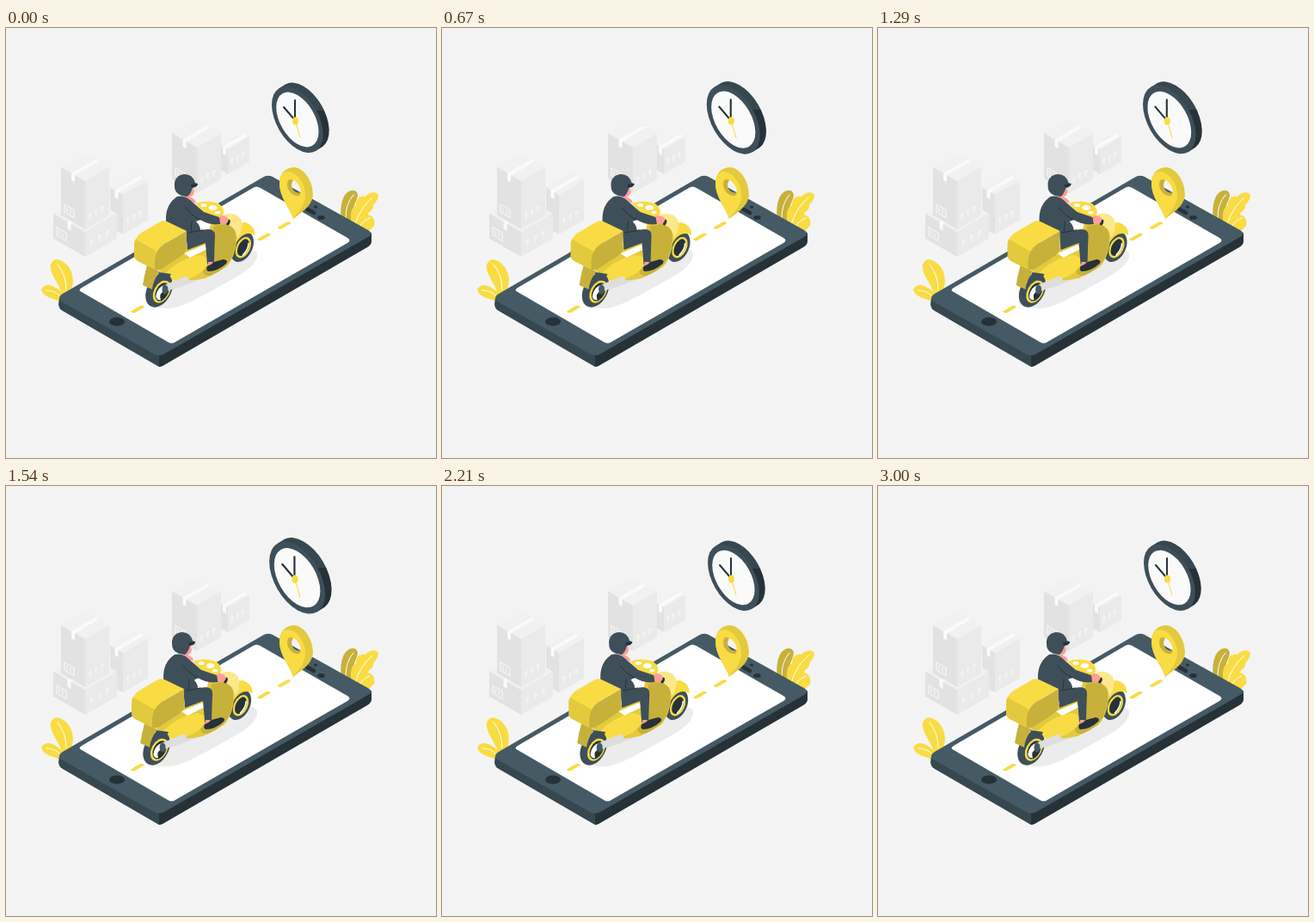
An HTML page that plays this animation: 500x500 px, repeating every 3040 ms.

```html
<!DOCTYPE html>
<html lang="en">
<head>
<meta charset="utf-8">
<title>Scooter delivery</title>
<style>
html, body { margin: 0; width: 100%; height: 100%; overflow: hidden; background: #f3f3f3; }
svg { display: block; width: 100vw; height: 100vh; }
.y { fill: #f9dc43; }
.m { fill: #e3c93d; }
.d { fill: #c7b13b; }
.n { fill: #37474f; }
.r { fill: #3f4f5a; }
.k { fill: #263238; }
.s { fill: #455a64; }
.w { fill: #fff; }
.p { fill: #ff9e98; }
.line { fill: none; stroke-linecap: round; stroke-linejoin: round; }
</style>
</head>
<body>
<svg viewBox="0 0 500 500">
  <defs>
    <linearGradient id="rim" x1="0" y1="62" x2="0" y2="146" gradientUnits="userSpaceOnUse">
      <stop offset=".4" stop-color="#37474f"/><stop offset=".4" stop-color="#263238"/>
    </linearGradient>
  </defs>

  <ellipse cx="250" cy="300" rx="217" ry="125" fill="#f4f4f4"/>
  <g id="cartons"></g>

  <!-- plants -->
  <path class="y" d="M65 311C64 299 50 287 52 275Q56 266 65 271C76 277 81 291 76 305Z"/>
  <path class="y" d="M63 318C54 314 43 313 41 304Q45 297 54 300Q63 304 69 312Z"/>
  <path class="line" stroke="#fff" d="M60 275Q70 287 70 304M47 305Q57 305 63 312"/>
  <path class="d" d="M390 223C388 207 391 192 401 189Q408 188 409 194C408 203 402 207 402 226Z"/>
  <path class="y" d="M403 232C399 218 401 209 407 206C407 198 413 194 418 196C423 190 432 190 433 195C432 203 426 204 427 209C424 214 421 214 421 217C428 219 429 224 428 230L420 238Z"/>
  <path class="line" stroke="#fff" d="M395 221Q395 204 404 194M406 229Q411 210 426 197M411 231Q416 223 423 221"/>

  <!-- phone -->
  <path class="k" d="M178 380L425 238V248Q425 252 420 255L182 393Q180 394 178 394Z"/>
  <path class="n" d="M62 314L178 380V394L66 329Q61 326 61 321Z"/>
  <path class="s" d="M66 309L298 174Q304 170 310 173L421 235Q428 239 421 243L184 379Q178 382 172 379L66 319Q58 314 66 309Z"/>
  <path class="w" d="M88 302L287 186Q291 183 296 186L397 244Q402 247 397 250L197 365Q193 368 188 365L88 307Q83 305 88 302Z"/>
  <ellipse class="k" cx="129" cy="341.500" rx="9" ry="5"/>
  <path class="line" stroke="#263238" stroke-width="4.500" d="M350 210.500L358 215"/>
  <ellipse class="k" cx="366.500" cy="220.500" rx="4.300" ry="2.500"/>
  <ellipse class="k" cx="360" cy="208" rx="2.200" ry="1.500"/>
  <path class="y" id="dashes"/>

  <!-- location pin -->
  <path class="m" fill-rule="evenodd" d="M334 222C330 209 318 197 318 181C318 169 325 162 336 162C348 164 357 179 357 194C356 207 344 214 334 222ZM334 177C339 176 344 184 343 190C342 194 336 192 333 187C331 182 331 178 334 177Z"/>
  <path class="y" fill-rule="evenodd" d="M334 222C330 209 318 197 318 181C318 172 322 167 328 167C340 168 349 183 348 197C347 207 340 213 334 222ZM330 176C326 176 326 182 328 187C331 193 337 197 341 195C344 192 343 187 340 182C337 178 333 175 330 176Z"/>
  <path class="d" d="M330 176Q326 178 328 187Q333 196 341 195L343 191Q337 193 333 187Q331 181 334 177Z"/>

  <!-- scooter shadow -->
  <path fill="#ececec" d="M163 318C165 309 180 302 200 292L270 258C283 253 294 258 292 266C289 277 275 286 258 295C232 309 212 322 193 326Q164 327 163 318Z"/>

  <g id="scooter">
    <!-- front wheel and fender -->
    <g transform="translate(274.500 254.500) rotate(26)">
      <ellipse class="r" rx="12" ry="18.500"/>
      <ellipse class="y" cx="1.500" rx="8" ry="13"/>
      <ellipse class="k" cx="1.500" rx="5.800" ry="10.500"/>
      <path class="line" stroke="#fff" stroke-width="1.500" d="M5 8Q8 0 5 -7"/>
    </g>
    <path class="y" d="M260 243Q263 227 278 226Q290 230 289.500 241Q280 236 272 244Q266 250 262 263Z"/>
    <!-- body -->
    <path class="line" stroke="#dedede" stroke-width="9" d="M190 301L225 288"/>
    <path class="m" d="M176 280L206 255L233 249L238 228Q252 219 265 226Q271 236 267 255Q264 270 256 278L232 291Q208 296 188 292Z"/>
    <path class="d" d="M241 231Q256 225 266 232Q270 250 262 268Q255 281 238 288Q230 289 229 283Q243 270 243 254Z"/>
    <path fill="#fbe88b" d="M254 217Q266 213 273 222Q277 234 269 244Q267 231 256 228Z"/>
    <path class="y" d="M184 287Q198 270 224 264Q236 265 234 275Q229 286 211 292Q198 296 188 292Z"/>
    <path class="w" d="M207 262L231 252L234 257L214 267Z"/>
    <!-- handlebar -->
    <path class="y" d="M220 204Q233 199 247 204Q256 210 252 219Q241 222 231 215Z"/>
    <path class="line" stroke="#3f4f5a" stroke-width="2" d="M229 215L249 224"/>
    <ellipse class="w" cx="230" cy="206" rx="3.500" ry="2"/>
    <ellipse class="w" cx="240.500" cy="209" rx="5" ry="3"/>
    <ellipse class="w" cx="246" cy="214.500" rx="3.200" ry="1.800"/>
    <ellipse class="k" cx="258.500" cy="226" rx="2" ry="3.500" transform="rotate(20 258.500 226)"/>
    <!-- rear wheel -->
    <g transform="translate(178 305) rotate(28)">
      <ellipse class="r" rx="14" ry="21"/>
      <ellipse class="y" cx="3.500" rx="9" ry="14"/>
      <ellipse class="k" cx="4" rx="7" ry="11.500"/>
      <path class="w" d="M0 8Q-4 -2 3 -9L6 -2Q1 3 7 9Q3 12 0 8Z"/>
    </g>
    <path class="line" stroke="#dedede" stroke-width="8" d="M187 302L209 293"/>
    <ellipse class="s" cx="185" cy="304" rx="3.500" ry="5.500"/>
    <path class="d" d="M164 276L179 283Q171 293 170 304L159 299Q161 286 164 276Z"/>
    <path class="r" d="M178 284L192 286L188 294L175 292Z"/>
    <!-- rider -->
    <path class="p" d="M209 185H217L219 190Q218 196 214 196L220 200L221 204L207 199Z"/>
    <path class="r" d="M196 184C195 175 201 170 208 170Q217 170 220 180L223 181Q223 184 217 185Q215 193 211 196Q196 195 196 184Z"/>
    <path class="k" d="M215 182L223 181Q223 185 216 186Z"/>
    <path class="r" d="M199 196Q207 194 214 200L230 214L248 220Q252 223 249 228Q237 230 226 223L221 225Q226 230 226 235L235 234Q243 234 243 241L242 272L234 275L232 250L211 258L209 236L186 225Q185 205 199 196Z"/>
    <path class="line" stroke="#263238" d="M209 209Q215 218 226 223M216 225L215 236M212 238L229 235"/>
    <path class="p" d="M248 219Q254 216 258 221Q260 225 255 228L249 227Z"/>
    <path class="p" d="M235 272L240 272L240 280L234 280Z"/>
    <path class="k" d="M234 277Q238 276 242 272L253 269Q259 270 256 274Q246 283 235 283Q232 281 234 277Z"/>
    <!-- cargo box -->
    <path class="m" d="M152 244Q149 247 149 252V266Q150 269 153 271L173 281L181 255Z"/>
    <path class="y" d="M151 246Q152 242 156 239L178 226Q182 223 187 225L210 236L187 249Q180 254 176 260Z"/>
    <path class="d" d="M173 281V270Q174 258 184 251L210 236V257Q209 261 204 265L181 280Q177 282 173 281Z"/>
  </g>

  <g id="clock">
    <path fill="url(#rim)" d="M317.400 70.200l8 -5A42.250 24.400 60 0 1 368.400 137.800l-8 5Z"/>
    <g transform="matrix(.866 .5 0 1 338.900 106.500)">
      <circle class="r" r="34.500"/>
      <circle r="28.500" fill="#fafafa"/>
    </g>
    <path class="line" stroke="#263238" stroke-width="2" d="M336 106V84M335 106L323 92"/>
    <path class="line" stroke="#f9dc43" d="M336.500 108L342 127"/>
    <ellipse class="y" cx="336.500" cy="108" rx="3.500" ry="4.500"/>
  </g>
</svg>
<script>
const $ = id => document.getElementById(id);
const SLOPE = 0.577, RUN = 3000, LOOP = 3040;

// Carton: (x, y) is the near top corner, l and r its side widths, h its height.
function carton(x, y, l, r, h) {
  const ly = -l * SLOPE, ry = -r * SLOPE;
  const path = (fill, d) => `<path fill="${fill}" d="${d}"/>`;
  const arrow = i => `M${r * .2 + i * r * .25} ${h - 8}v-7m-2 2l2 -2l2 2`;
  const half = l / 2;
  return path('#f1f1f1', `M${x} ${y}l${-l} ${ly}l${r} ${ry}l${l} ${-ly}z`) +
    path('#e2e2e2', `M${x} ${y}l${-l} ${ly}v${h}l${l} ${-ly}z`) +
    path('#eaeaea', `M${x} ${y}l${r} ${ry}v${h}l${-r} ${-ry}z`) +
    path('#fafafa', `M${x - half - 2} ${y + ly / 2 - 1}l${r} ${ry}l4 2.3l${-r} ${-ry}v8l-4 -2.3z`) +
    `<g fill="none" stroke="#f5f5f5" stroke-width="1.3">` +
    (l > 15 ? `<path transform="matrix(1 ${SLOPE} 0 1 ${x - l} ${y + ly})" d="M4 ${h - 15}h11v9h-11zM7 ${h - 13}v5M11 ${h - 13}v5"/>` : '') +
    `<path transform="matrix(1 ${-SLOPE} 0 1 ${x} ${y})" d="${[0, 1, 2].map(arrow).join('')}"/></g>`;
}

$('cartons').innerHTML = [
  [258, 141, 8, 25, 29], [222, 139, 29, 28, 53], [136, 194, 15, 29, 46],
  [92, 237, 37, 37, 29], [92, 178, 28, 28, 56]
].map(c => carton(...c)).join('');

$('dashes').setAttribute('d', [[145, 329.5], [292, 245.5], [315.5, 232]]
  .map(([x, y]) => `M${x} ${y}l11 -6.5q4 -1 5 1.5l-11 6.5q-4 1 -5 -1.5z`).join(''));

// Linear interpolation through [progress, value] stops.
function track(stops, p) {
  const i = Math.max(1, stops.findIndex(s => s[0] >= p));
  const [a, from] = stops[i - 1], [b, to] = stops[i];
  return from + (to - from) * (p - a) / (b - a);
}

const shake = [0, -1, 2, -4, 4, -4, 4, -4, 2, -1, 0].map((x, i) => [i / 10, x]);
const beat = [[0, 1], [.1, 1.1], [.3, 1], [.4, 1], [.5, 1.1], [.6, 1], [1, 1]];

function draw() {
  const p = Math.min(1, performance.now() % LOOP / RUN);
  $('scooter').setAttribute('transform', `translate(${track(shake, p)} 0)`);
  $('clock').setAttribute('transform', `translate(342.5 104) scale(${track(beat, p)}) translate(-342.5 -104)`);
  requestAnimationFrame(draw);
}
draw();
</script>
</body>
</html>
```
